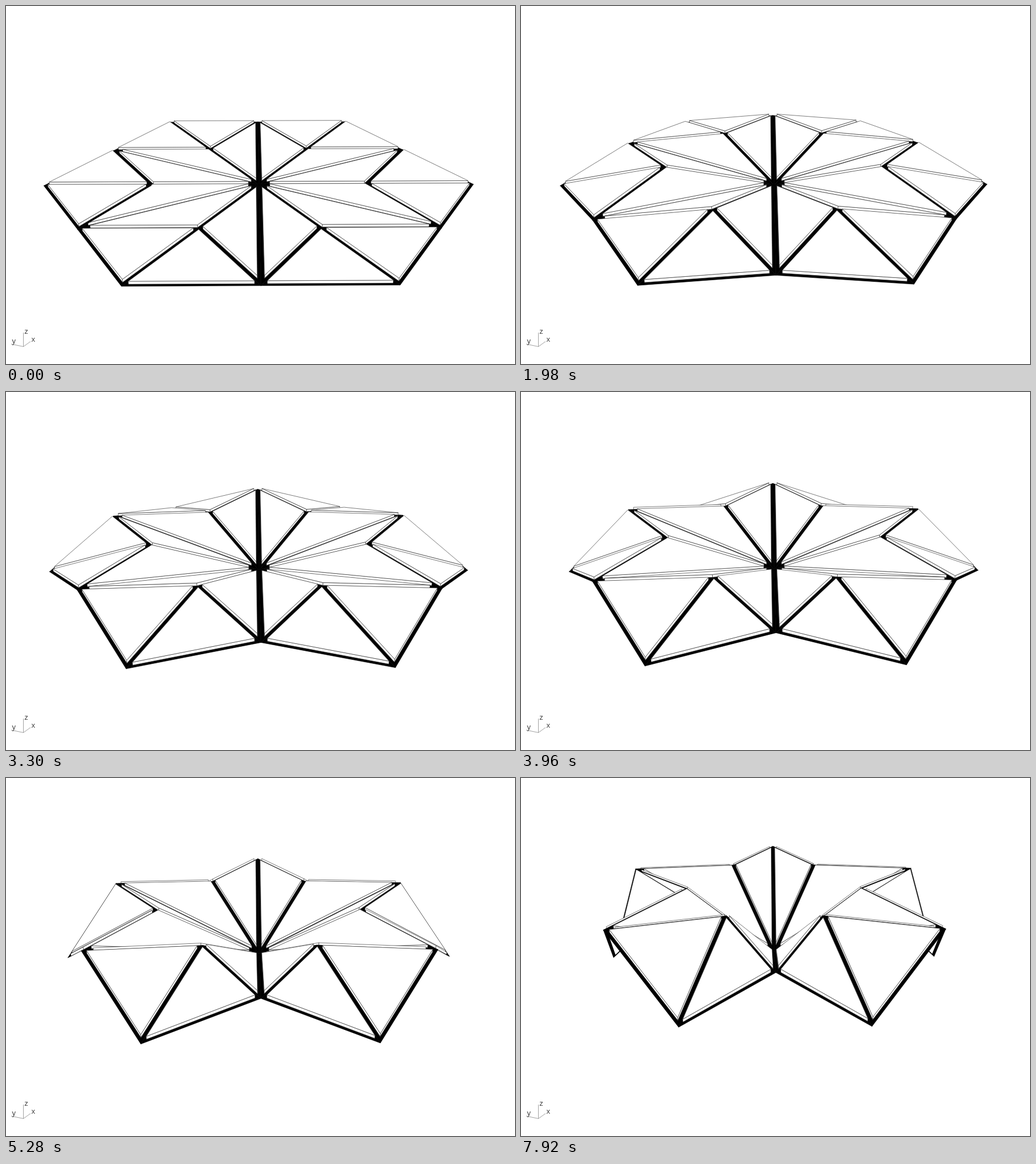
Recreate the animation shown at these times as an HTML page with a canvas. Size 892 by 628 pixels, loop 8000 ms.

```html
<!DOCTYPE html>
<html lang="en">
<head>
<meta charset="utf-8">
<title>Folding hexagon</title>
<style>
  html, body { margin: 0; width: 100%; height: 100%; overflow: hidden; background: #fff; }
  canvas { display: block; }
</style>
</head>
<body>
<canvas id="stage" width="892" height="628"></canvas>
<script>
const ctx = document.getElementById('stage').getContext('2d');
const LOOP = 8000, STEP = 330, KEY = 1320;
const INSET = 0.0133, LIFT = [0, 0, 0.0125];

// Camera: the unit hexagon seen from a low height, turned very slightly.
const VIEW = { x: 443.5, y: 314, scale: 376.5, dist: 3.43, tilt: 0.4306, yaw: 0.008 };

// Radius and height of each ring of vertices, one value per KEY ms.
const POSE = {
  midR:   [.866, .8625, .859, .8505, .828, .8026, .79],
  midZ:   [0, .0102, .0787, .151, .22, .272, .3026],
  innerR: [.5, .5, .5, .49, .46, .425, .39],
  innerZ: [0, .077, .1, .167, .235, .295, .339],
  tipR:   [1, .995, .988, .952, .888, .816, .746],
  hubZ:   [0, 0, 0, .006, .012, .016, .02]
};

const add = (a, b, s = 1) => a.map((v, i) => v + b[i] * s);
const sub = (a, b) => add(a, b, -1);
const dot = (a, b) => a.reduce((sum, v, i) => sum + v * b[i], 0);
const unit = a => a.map(v => v / Math.hypot(...a));

function spline(p, u) {
  const i = Math.min(Math.floor(u), p.length - 2), f = u - i, last = p.length - 1;
  const b = p[i], c = p[i + 1];
  const a = i ? p[i - 1] : b;
  const d = i + 2 <= last ? p[i + 2] : 2 * c - b;
  return b + f / 2 * (c - a + f * (2 * a - 5 * b + 4 * c - d + f * (3 * (b - c) + d - a)));
}

function toCamera([x, y, z]) {
  const c = Math.cos(VIEW.yaw), s = Math.sin(VIEW.yaw);
  const across = x * c - y * s, away = x * s + y * c;
  const st = Math.sin(VIEW.tilt), ct = Math.cos(VIEW.tilt);
  return [across, away * st + z * ct, VIEW.dist + away * ct - z * st];
}

function project(point) {
  const [x, y, w] = toCamera(point);
  const k = VIEW.scale * VIEW.dist / w;
  return [VIEW.x + k * x, VIEW.y - k * y];
}

function facesCamera(poly) {
  const area = poly.reduce((sum, [x, y], i) => {
    const [nx, ny] = poly[(i + 1) % poly.length];
    return sum + x * ny - nx * y;
  }, 0);
  return area < 0;
}

function drawPoly(poly, fill, stroke, width) {
  ctx.beginPath();
  poly.forEach(p => ctx.lineTo(...p));
  ctx.closePath();
  ctx.fillStyle = fill;
  ctx.fill();
  if (!stroke) return;
  ctx.strokeStyle = stroke;
  ctx.lineWidth = width;
  ctx.stroke();
}

const drawBase = poly => drawPoly(poly, '#000', '#000', 0.6);
const drawWhite = poly => drawPoly(poly, '#fff', '#333', 0.65);

function insetTriangle(tri) {
  return tri.map((v, i) => {
    const a = unit(sub(tri[(i + 1) % 3], v)), b = unit(sub(tri[(i + 2) % 3], v));
    const sine = Math.sqrt(1 - dot(a, b) ** 2);
    return add(v, add(a, b), INSET / sine);
  });
}

// A black triangle with a slightly smaller white plate extruded straight up.
function drawFace(tri) {
  const plate = insetTriangle(tri);
  const base = tri.map(project);
  const bottom = plate.map(project);
  const top = plate.map(p => project(add(p, LIFT)));
  const drawSides = () => [0, 1, 2].forEach(i => {
    const j = (i + 1) % 3, side = [bottom[i], bottom[j], top[j], top[i]];
    if (facesCamera(side)) drawWhite(side);
  });
  if (facesCamera(base)) {
    drawBase(base);
    drawSides();
    drawWhite(top);
  } else {
    drawSides();
    drawBase(base);
    drawPoly(bottom, '#fff');
  }
}

function buildFaces(u) {
  const v = {};
  for (const name in POSE) v[name] = spline(POSE[name], u);
  const ring = (r, z, degrees) => {
    const a = degrees * Math.PI / 180;
    return [r * Math.cos(a), r * Math.sin(a), z];
  };
  const hub = [0, 0, v.hubZ];
  const faces = [];
  for (let angle = 90; angle < 450; angle += 60) {
    const mid = ring(v.midR, v.midZ, angle);
    const next = ring(v.midR, v.midZ, angle + 60);
    const inner = ring(v.innerR, v.innerZ, angle + 30);
    const tip = ring(v.tipR, 0, angle + 30);
    faces.push([mid, tip, inner], [tip, next, inner], [mid, inner, hub], [inner, next, hub]);
  }
  const depth = tri => tri.reduce((sum, p) => sum + toCamera(p)[2], 0);
  return faces.sort((a, b) => depth(b) - depth(a));
}

function drawAxes() {
  ctx.strokeStyle = '#888';
  ctx.lineWidth = 0.8;
  ctx.beginPath();
  for (const end of [[30.5, 573], [43, 588.5], [9, 593]]) {
    ctx.moveTo(30.5, 597.5);
    ctx.lineTo(...end);
  }
  ctx.stroke();
  ctx.fillStyle = '#444';
  ctx.font = '13px "Liberation Sans", Arial, sans-serif';
  ctx.textAlign = 'center';
  ctx.fillText('z', 35.5, 575);
  ctx.fillText('x', 47.8, 589);
  ctx.fillText('y', 13.7, 592);
}

function frame(now) {
  const time = Math.floor(now % LOOP / STEP) * STEP;
  ctx.fillStyle = '#fff';
  ctx.fillRect(0, 0, 892, 628);
  ctx.lineJoin = 'round';
  buildFaces(time / KEY).forEach(drawFace);
  drawAxes();
  requestAnimationFrame(frame);
}
requestAnimationFrame(frame);
</script>
</body>
</html>
```
